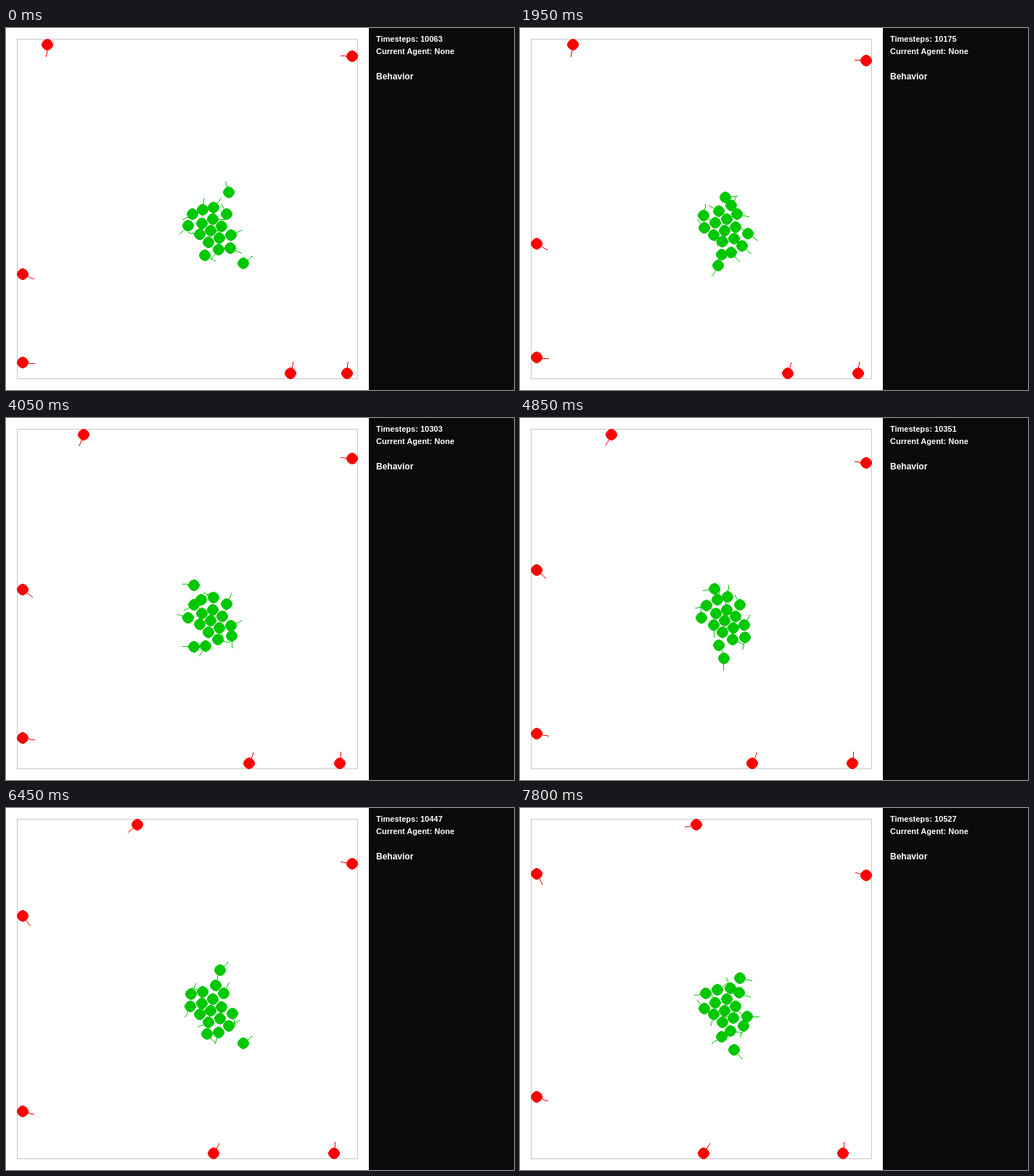
An HTML page with a canvas that plays this animation: 700 by 500 pixels, repeating every 8 s.

```html
<!DOCTYPE html>
<html lang="en">
<head>
<meta charset="utf-8">
<title>Aggregating agents</title>
<style>
  html, body { margin: 0; width: 100%; height: 100%; overflow: hidden; background: #fff; }
  canvas, svg { position: absolute; left: 0; top: 0; }
  text { font: bold 11px "Liberation Sans", Arial, sans-serif; fill: #fff; }
  .title { font-size: 12px; }
</style>
</head>
<body>
<canvas id="stage" width="700" height="500"></canvas>
<svg width="700" height="500">
  <text id="counter" x="510" y="19"></text>
  <text x="510" y="36">Current Agent: None</text>
  <text class="title" x="510" y="71">Behavior</text>
</svg>
<script>
const ctx = document.getElementById('stage').getContext('2d');
const counter = document.getElementById('counter');
const LOOP = 8000, RADIUS = 8, SPEED = 13.8;
const RED = '#f00', GREEN = '#00c800';
const CENTER = { x: 282, y: 280 };
const rad = degrees => degrees * Math.PI / 180;

// Strays back into a wall (inward normal in degrees) and slide along it;
// their lean away from the normal grows exponentially.
const strays = [
  { normal: 90, x: 57, y: 23, lean: 0.122, growth: 0.084 },
  { normal: 180, x: 477, y: 39, lean: 0.054, growth: 0.056 },
  { normal: 0, x: 23, y: 340, lean: 0.397, growth: 0.035 },
  { normal: 0, x: 23, y: 462, lean: 0.058, growth: 0.061 },
  { normal: -90, x: 392, y: 477, lean: 0.22, growth: 0.031 },
  { normal: -90, x: 470, y: 477, lean: 0.035, growth: 0.036 },
];

// Hard-edged disc with a one-pixel heading line.
function drawAgent(x, y, heading, color) {
  x = Math.round(x);
  y = Math.round(y);
  ctx.fillStyle = color;
  for (let row = -RADIUS; row < RADIUS; row++) {
    const half = Math.floor(Math.sqrt(RADIUS ** 2 - (row + 0.5) ** 2) + 0.15);
    ctx.fillRect(x - half, y + row, 2 * half, 1);
  }
  const dx = 16 * Math.cos(heading), dy = 16 * Math.sin(heading);
  const n = Math.round(Math.max(Math.abs(dx), Math.abs(dy)));
  for (let k = 0; k <= n; k++) {
    ctx.fillRect(Math.round(x + dx * k / n), Math.round(y + dy * k / n), 1, 1);
  }
}

function drawStray({ normal, x, y, lean, growth }, tick) {
  const leanAt = t => lean * Math.exp(growth * t);
  let slide = 0;
  for (let t = 0; t < tick; t++) slide += SPEED * Math.sin(leanAt(t + 0.5));
  const along = rad(normal - 90);
  drawAgent(x + slide * Math.cos(along), y + slide * Math.sin(along),
    rad(normal) + leanAt(tick), RED);
}

// Slow wobble between -1 and 1, different for every seed.
const wave = (seed, tick) => Math.sin(tick * (0.3 + 0.06 * (seed % 5)) + seed * 2.4);

function drawPolar(angle, distance, heading) {
  drawAgent(CENTER.x + distance * Math.cos(rad(angle)),
    CENTER.y + distance * Math.sin(rad(angle)), heading, GREEN);
}

// Hexagonal packing: a center, six neighbours, and a partly filled outer shell.
function drawCluster(tick) {
  drawPolar(0, 0, tick * 0.6);
  for (let n = 0; n < 6; n++) {
    drawPolar(60 * n - 80, 16 + wave(n, tick) / 2, n * 2.4 + tick * 0.6);
  }
  for (let n = 0; n < 12; n++) {
    const slot = 30 * n - 140;
    if ([-20, 130, 160].includes(slot)) continue;
    const distance = n % 2 ? 28 : 32;
    drawPolar(slot + 4 * wave(n + 3, tick), distance + 2 + 2 * wave(n, tick),
      rad(slot) + 1.3 * wave(n + 7, tick));
  }
  // Two loose agents swing around the outside, above and below.
  const above = -90 + 25 * Math.cos(tick * 0.22);
  drawPolar(above, 52 + 6 * Math.cos(tick * 0.5), rad(above) + 1.4 * wave(5, tick));
  const swing = Math.cos(tick * 0.26);
  const below = 90 - 45 * swing;
  drawPolar(below, 52 + 12 * swing, rad(below) - 1.5 * swing);
}

// Three ticks in every 800 ms.
function tickAt(time) {
  const t = time - 350;
  if (t < 0) return 0;
  return 3 * Math.floor(t / 800) + Math.min(3, 1 + Math.floor(t % 800 / 250));
}

function draw(tick) {
  ctx.fillStyle = '#fff';
  ctx.fillRect(0, 0, 500, 500);
  ctx.fillStyle = '#0a0a0a';
  ctx.fillRect(500, 0, 200, 500);
  ctx.strokeStyle = '#c8c8c8';
  ctx.strokeRect(15.5, 15.5, 469, 469);
  drawCluster(tick);
  strays.forEach(stray => drawStray(stray, tick));
  counter.textContent = 'Timesteps: ' + (10063 + 16 * tick);
}

const start = performance.now();
function frame() {
  draw(tickAt((performance.now() - start) % LOOP));
  requestAnimationFrame(frame);
}
frame();
</script>
</body>
</html>
```
